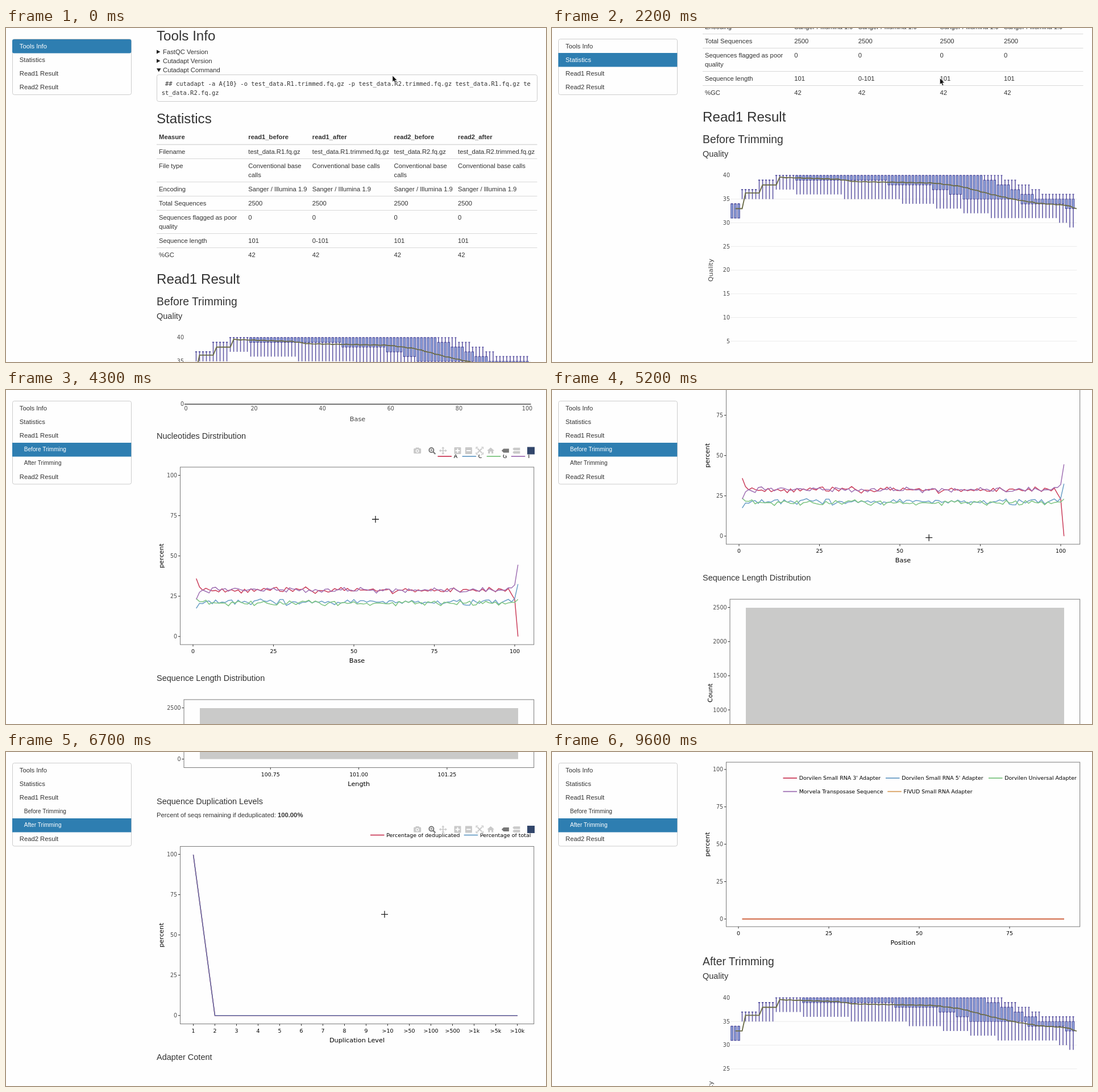
Animation, 950 px wide and 589 px high, one loop 9.9 s. Source, as an HTML page:

```html
<!DOCTYPE html>
<html lang="en">
<head>
<meta charset="utf-8">
<title>Trimming report</title>
<style>
html, body { margin: 0; width: 100%; height: 100%; overflow: hidden; background: #fefefe; }
svg { display: block; width: 950px; height: 589px; }
text { white-space: pre; fill: #333; font-family: "Liberation Sans", Arial, sans-serif; }
.h1 { font-size: 24.18px; }
.h2 { font-size: 19.34px; }
.h3 { font-size: 14.5px; }
.body { font-size: 11.28px; }
.sub { font-size: 10.15px; }
.code { font-size: 10.48px; font-family: "DejaVu Sans Mono", monospace; }
.tick, .key, .title, .name { font-family: "DejaVu Sans", sans-serif; }
.tick { font-size: 9.6px; fill: #4d4d4d; }
.key { font-size: 9.42px; fill: #000; }
.title { font-size: 11.28px; fill: #000; }
.name { font-size: 11.28px; fill: #444; }
.on { fill: #fff; }
</style>
</head>
<body>
<svg viewBox="0 0 950 589">
  <g id="page"></g>
  <g id="menu"></g>
  <g id="cross">
    <path d="M-6 0H6M0 -6V6" stroke="#fff" stroke-width="3"/>
    <path d="M-6 0H6M0 -6V6" stroke="#222" stroke-width="1.3"/>
  </g>
  <path id="arrow" d="M0 0V11L2.5 8.8L4.4 13L6.2 12.2L4.4 8.2H8Z" fill="#111" stroke="#fff" stroke-width=".5"/>
</svg>
<script>
const LOOP = 9900, STEP = 100;
const SIZE = { h1: 24.18, h2: 19.34, h3: 14.5, body: 11.28, sub: 10.15, code: 10.48, tick: 9.6, key: 9.42, title: 11.28, name: 11.28 };
const RED = '#cb3f5c', BLUE = '#6a9ec6', GREEN = '#7cc481', PURPLE = '#a071b4', ORANGE = '#d9a05f';
const PALE = '#c9c9c9', DARK = '#777', BG = '#fefefe';
const $ = id => document.getElementById(id);
const range = n => [...Array(n).keys()];
const each = (list, fn) => list.map(fn).join('');
const clamp = (v, lo, hi) => Math.min(hi, Math.max(lo, v));

// y is the middle of the capitals
const text = (x, y, cls, str, attr = '') =>
  `<text class="${cls}" x="${x}" y="${y + SIZE[cls.split(' ')[0]] * .36}" ${attr}>${str}</text>`;
const mid = (x, y, cls, str) => text(x, y, cls, str, 'text-anchor="middle"');
const end = (x, y, cls, str) => text(x, y, cls, str, 'text-anchor="end"');
const side = (x, y, cls, str) => text(x, y, cls, str, `text-anchor="middle" transform="rotate(-90 ${x} ${y})"`);
const path = (d, stroke, w = 1, fill = 'none') =>
  `<path d="${d}" fill="${fill}" stroke="${stroke}" stroke-width="${w}"/>`;
const rect = (x, y, w, h, fill, stroke = 'none', rx = 0) =>
  `<rect x="${x}" y="${y}" width="${w}" height="${h}" rx="${rx}" fill="${fill}" stroke="${stroke}"/>`;
const poly = pts => 'M' + pts.map(p => p[0].toFixed(1) + ' ' + p[1].toFixed(1)).join('L');
const legend = (x, y, color, str) => path(`M${x} ${y}h24.5`, color, 1.8) + text(x + 28.2, y, 'key', str);

// Linear value between [key, ...values] rows
function lerp(rows, t) {
  const n = rows.findIndex(r => r[0] >= t);
  if (n < 0) return rows[rows.length - 1].slice(1);
  if (!n) return rows[0].slice(1);
  const a = rows[n - 1], b = rows[n], f = (t - a[0]) / (b[0] - a[0]);
  return a.slice(1).map((v, i) => v + (b[i + 1] - v) * f);
}

function table() {
  const cols = [269, 426.3, 538.8, 682.5, 795], file = s => `test_data.${s}.fq.gz`;
  const wrapped = 'Conventional base\ncalls', calls = 'Conventional base calls';
  const row = (name, v, v2 = v) => [name, v, v2, v, v];
  const rows = [
    ['Filename', file('R1'), file('R1.trimmed'), file('R2'), file('R2.trimmed')],
    ['File type', wrapped, calls, wrapped, calls],
    row('Encoding', 'Sanger / Illumina 1.9'),
    row('Total Sequences', '2500'),
    row('Sequences flagged as poor\nquality', '0'),
    row('Sequence length', '101', '0-101'),
    row('%GC', '42')
  ];
  const head = ['Measure', 'read1_before', 'read1_after', 'read2_before', 'read2_after'];
  let y = 218, out = each(head, (s, i) => text(cols[i], 192.3, 'body', s, 'font-weight="bold"'));
  rows.forEach((cells, n) => {
    out += path(`M265 ${y - 12.5}H934.5`, '#d8d8d8', n ? 1 : 1.7);
    out += each(cells, (s, i) => each(s.split('\n'), (part, j) => text(cols[i], y + j * 16, 'body', part)));
    y += cells.some(s => s.includes('\n')) ? 41 : 25;
  });
  return out;
}

const intro = () => text(265, 13, 'h1', 'Tools Info') +
  '<path d="M265 38.5L271.5 42L265 45.5ZM265 54.5L271.5 58L265 61.5ZM265 71.2H272.6L268.8 77.4Z" fill="#222"/>' +
  each(['FastQC Version', 'Cutadapt Version', 'Cutadapt Command'], (s, i) => text(276, 42 + i * 16.1, 'body', s)) +
  rect(265.5, 82.5, 669, 47, 'none', '#ccc', 3.2) +
  text(273.7, 98.5, 'code', ' ## cutadapt -a A{10} -o test_data.R1.trimmed.fq.gz -p test_data.R2.trimmed.fq.gz test_data.R1.fq.gz te') +
  text(273.7, 114, 'code', 'st_data.R2.fq.gz') +
  text(265, 159, 'h1', 'Statistics') + table() + text(265, 442, 'h1', 'Read1 Result');

// Scores climb in four stairs, then sag along these curves
const stair = i => Math.min(3, Math.floor((i + 2) / 5));
const sag = {
  mean: [[14, 39.6], [31, 39.2], [36, 38.7], [59, 38.4], [67, 37.7], [76, 36], [83, 34.9], [90, 34.1], [98, 33.7], [101, 33]],
  q1: [[13, 40], [20, 39.4], [44, 38.6], [58, 37.6], [68, 35.4], [86, 34.4], [100, 33.3]],
  low: [[13, 37.3], [20, 36.3], [31, 35.6], [48, 34.7], [60, 33.4], [76, 31.4], [95, 30.8], [100, 28.8]]
};
function score(i, lag) {
  const n = stair(i);
  if (n < 3) {
    const top = [34, 37, 39][n];
    return { low: n ? 35 : 31, q1: n ? top : 31, q3: top, top };
  }
  const fall = (from, floor) => Math.round(clamp(39.4 - (i - from) * .27, floor, 40));
  const at = name => Math.round(lerp(sag[name], i - (i < 90 ? lag : 0))[0]);
  return { low: at('low'), q1: at('q1'), q3: fall(74 + lag / 2, 35), top: fall(80, 36) };
}
const mean = i => stair(i - 1) < 3
  ? [33, 36.3, 38][stair(i - 1)]
  : lerp(sag.mean, i)[0] + Math.sin(i * 2.3) * .07;

function quality(o, name, lag) {
  const X = i => 316.5 + i * 6.005, Y = v => o + 546 + (40 - v) * 8.35;
  let line = '', box = '';
  for (const i of range(101)) {
    const s = score(i, lag), x = X(i);
    line += `M${x} ${Y(s.q1)}V${Y(s.low)}M${x} ${Y(s.q3)}V${Y(s.top)}M${x - 1.5} ${Y(s.top)}h3`;
    box += `M${x - 1.7} ${Y(s.q1)}V${Y(s.q3)}h3.4V${Y(s.q1)}Z`;
  }
  return text(265, o + 482, 'h2', name) + text(265, o + 507.7, 'h3', 'Quality') +
    each(range(9), n => (n % 8 ? path(`M314 ${Y(n * 5)}H923.5`, '#ebebeb') : '') + end(313, Y(n * 5), 'tick', n * 5)) +
    path(line, '#625aa6', 1.6) + path(box, '#524f9f', 1.2, '#93abe0') +
    path(poly(range(101).map(i => [X(i + 1), Y(mean(i + 1))])), '#6b6c48', 1.9) +
    path(`M314 ${Y(0)}H923.5`, '#444', 1.4) +
    each(range(6), n => mid(X(n * 20), Y(0) + 7.3, 'tick', n * 20)) +
    mid(618.5, Y(0) + 26, 'name', 'Base') + side(279, Y(20), 'name', 'Quality');
}

// Plot areas on the page, with the height of their toolbars
const plots = {
  bases: { x: 306.5, y: 991, h: 313, bar: 962 },
  lengths: { x: 313, y: 1401, h: 330.5, bar: 1389.5, wide: true },
  copies: { x: 306.5, y: 1870.5, h: 313, bar: 1840.5 },
  adapters: { x: 306.5, y: 2320, h: 290, bar: 2268 }
};
function frame({ x, y, h }, yTicks, xTicks, xName, yName) {
  const b = y + h;
  return rect(x, y, 928.7 - x, h, 'none', '#7a7a7a') +
    each(yTicks, ([v, p]) => end(x - 5.3, p, 'tick', v) + path(`M${x - 3.6} ${p}h3.6`, '#333')) +
    each(xTicks, ([v, p]) => mid(p, b + 11.7, 'key', v) + path(`M${p} ${b}v3.4`, '#333')) +
    mid((x + 928.5) / 2, b + 28.3, 'title', xName) + side(x > 310 ? 278 : 273, y + h / 2, 'title', yName);
}
const ticks = (n, by, from, per) => range(n).map(i => [i * by, from + i * by * per]);

function bases() {
  let seed = 11;
  const rnd = () => (seed = seed * 16807 % 2147483647) / 2147483647;
  const line = (start, avg, last, color) => path(poly(range(101).map(k => {
    const v = avg + (start - avg) * .45 ** k + (last - avg) * .2 ** (100 - k);
    const noise = k && k < 99 ? (rnd() + rnd() - 1) * 2.2 : 0;
    return [334.7 + k * 5.66, 1289.7 - (v + noise) * 2.842];
  })), color, 1.5);
  return text(265, 936, 'h3', 'Nucleotides Dirstribution') +
    each([['A', RED], ['C', BLUE], ['G', GREEN], ['T', PURPLE]], ([s, c], i) => legend(759.5 + i * 43.1, 972, c, s)) +
    frame(plots.bases, ticks(5, 25, 1289.7, -2.842), ticks(5, 25, 329, 5.66), 'Base', 'percent') +
    line(36, 28.7, 0, RED) + line(17.5, 21.4, 32.5, BLUE) +
    line(23.5, 20.7, 23, GREEN) + line(23, 28.9, 44.5, PURPLE);
}

const lengths = () => text(265, 1363, 'h3', 'Sequence Length Distribution') +
  frame(plots.lengths, ticks(6, 500, 1716.5, -.1204),
    range(3).map(i => [(100.75 + i / 4).toFixed(2), 465.3 + i * 155.3]), 'Length', 'Count') +
  rect(341, 1416, 560, 300.5, '#cacac9');

function copies() {
  const names = [...range(9).map(i => i + 1), ...['10', '50', '100', '500', '1k', '5k', '10k'].map(s => '&gt;' + s)];
  const curve = 'M329.5 1885L367.5 2168.7H900';
  return text(265, 1790.5, 'h3', 'Sequence Duplication Levels') +
    text(265, 1815, 'body', 'Percent of seqs remaining if deduplicated: <tspan font-weight="bold">100.00%</tspan>') +
    legend(641, 1850.5, RED, 'Percentage of deduplicated') + legend(805.7, 1850.5, BLUE, 'Percentage of total') +
    frame(plots.copies, ticks(5, 25, 2168.7, -2.842), names.map((s, i) => [s, 329.5 + i * 38]), 'Duplication Level', 'percent') +
    path(curve, RED, 1.6) + path(curve, '#5f6fa8', 1.5);
}

const adapters = () => text(265, 2242, 'h3', 'Adapter Cotent') +
  frame(plots.adapters, ticks(5, 25, 2596.5, -2.637), ticks(4, 25, 328, 6.36), 'Position', 'percent') +
  legend(406.5, 2348, RED, "Dorvilen Small RNA 3' Adapter") +
  legend(587, 2348, BLUE, "Dorvilen Small RNA 5' Adapter") +
  legend(768, 2348, GREEN, 'Dorvilen Universal Adapter') +
  legend(406.5, 2371.7, PURPLE, 'Morvela Transposase Sequence') +
  legend(590.3, 2371.7, ORANGE, 'FIVUD Small RNA Adapter') +
  path('M334.5 2596.5H901', '#d0623e', 2);

const square = rect(-6, -6, 12, 12, PALE, 'none', 1);
const icons = {
  camera: rect(-6.5, -4, 13, 9, PALE, 'none', 1.5) + rect(-3, -5.5, 6, 3, PALE) + `<circle cy=".5" r="2.3" fill="${PALE}" stroke="${BG}" stroke-width="1.3"/>`,
  zoom: `<circle cx="-1" cy="-1" r="4" fill="none" stroke="${DARK}" stroke-width="2"/>` + path('M2 2L6 6', DARK, 2.4) + path('M-3 -1h4M-1 -3v4', DARK),
  pan: path('M-5 0H5M0 -5V5', PALE, 1.6) + `<path d="M-7 0l3-2.5v5ZM7 0l-3-2.5v5ZM0-7l-2.5 3h5ZM0 7l-2.5-3h5Z" fill="${PALE}"/>`,
  select: `<rect x="-5.5" y="-5.5" width="11" height="11" fill="none" stroke="${PALE}" stroke-width="1.8" stroke-dasharray="2.2 1.5"/>`,
  lasso: `<ellipse cx=".5" cy="-1.5" rx="5.5" ry="3.8" fill="none" stroke="${PALE}" stroke-width="1.6"/>` + path('M-3 1Q-5 3 -2.5 6', PALE, 1.6),
  plus: square + path('M-3.8 0H3.8M0 -3.8V3.8', BG, 2),
  minus: square + path('M-3.8 0H3.8', BG, 2),
  fit: path('M-6 -3V-6H-3M3 -6H6V-3M6 3V6H3M-3 6H-6V3', PALE, 1.6) + path('M-4 -4L4 4M4 -4L-4 4', PALE, 1.8),
  home: `<path d="M0-5.5L6.5 0H4.5V5H1.3V1.5H-1.3V5H-4.5V0H-6.5Z" fill="${PALE}"/>`,
  tag: `<path d="M-6.5 0L-3-3.5H6.5V3.5H-3Z" fill="${DARK}"/>`,
  tags: `<path d="M-6.5-3L-4.5-5.3H6.5V-.8H-4.5ZM-6.5 3L-4.5.8H6.5V5.3H-4.5Z" fill="${PALE}"/>`,
  mark: rect(-6.5, -6.5, 13, 13, '#32466b')
};
// Icon groups run from right to left, a bar marks a wider gap
function toolbar({ bar, wide }) {
  const order = `mark | tags tag | home fit minus plus | ${wide ? 'lasso select ' : ''}pan zoom | camera`;
  let x = 923.5, out = '';
  for (const n of order.split(' ')) {
    if (n === '|') { x -= 6.3; continue; }
    out += `<g transform="translate(${x} ${bar})">${icons[n]}</g>`;
    x -= 19.4;
  }
  return rect(x + 10, bar - 8, 920 - x, 15, BG) + out;
}

const tip = () => path('M274 1401H337V1412L341 1416L337 1420V1431H274Z', '#555', 1, '#cacaca') +
  end(334, 1408.8, 'tick', 'Length: 101') + end(334, 1421.8, 'tick', 'Count: 2500');

function menu(active) {
  const open = active > 1, pitch = 24.2;
  const subs = open ? ['Before Trimming', 'After Trimming'] : [];
  const items = ['Tools Info', 'Statistics', 'Read1 Result', ...subs, 'Read2 Result'];
  return rect(11.5, 19.5, 209, items.length * pitch + 1.3, BG, '#ccc', 3.2) +
    rect(11, Math.round(20 + active * pitch), 209.3, 24.5, '#2e7eb1', 'none', active ? 0 : 3) +
    each(items, (s, i) => {
      const sub = subs.includes(s);
      return text(sub ? 31.7 : 23.8, 32 + i * 24.1, (sub ? 'sub' : 'body') + (i === active ? ' on' : ''), s);
    });
}

const scrolls = [[900, 0], [1600, 128], [2900, 470], [4300, 855], [4900, 890], [5800, 1316], [6900, 1790],
  [7200, 1790], [7900, 2226], [8000, 2300], [8200, 2302]];
const moves = [[900, 680, 84], [1600, 682, 88], [2900, 683, 89], [4300, 650, 228], [5800, 672, 282],
  [7900, 658, 292], [8400, 658, 295], [8500, 722, 302], [8800, 722, 302], [9400, 48, 1]];
const sections = [86, 300, 462, 1577];

const areas = Object.values(plots);
$('page').innerHTML = intro() + quality(0, 'Before Trimming', 0) + bases() + lengths() + copies() + adapters() +
  quality(2189.5, 'After Trimming', 2) +
  each(areas, (p, i) => `<g id="bar${i}">${toolbar(p)}</g>`) + `<g id="tip">${tip()}</g>`;

const show = (el, on) => el.setAttribute('visibility', on ? 'visible' : 'hidden');
let shown = -1;
function draw(t) {
  const top = Math.round(lerp(scrolls, t)[0]);
  const [x, y] = lerp(moves, t), py = y + top;
  $('page').setAttribute('transform', `translate(0 ${-top})`);
  const active = sections.filter(v => top >= v).length;
  if (active !== shown) $('menu').innerHTML = menu(shown = active);

  const over = (from, h) => x > 306 && py > from && py < from + h;
  areas.forEach((p, i) => show($('bar' + i), over(p.bar - 10, 390)));
  show($('tip'), over(1416, 300));

  const cross = t < 8500 && (over(546, 334) || areas.some(p => over(p.y, p.h)));
  const place = `translate(${x.toFixed(1)} ${y.toFixed(1)})`;
  $('cross').setAttribute('transform', place);
  $('arrow').setAttribute('transform', place);
  show($('cross'), cross);
  show($('arrow'), !cross && t < 9600);
}

const start = performance.now();
function tick() {
  const t = (performance.now() - start) % LOOP;
  draw(Math.floor(t / STEP) * STEP);
  requestAnimationFrame(tick);
}
tick();
</script>
</body>
</html>
```
